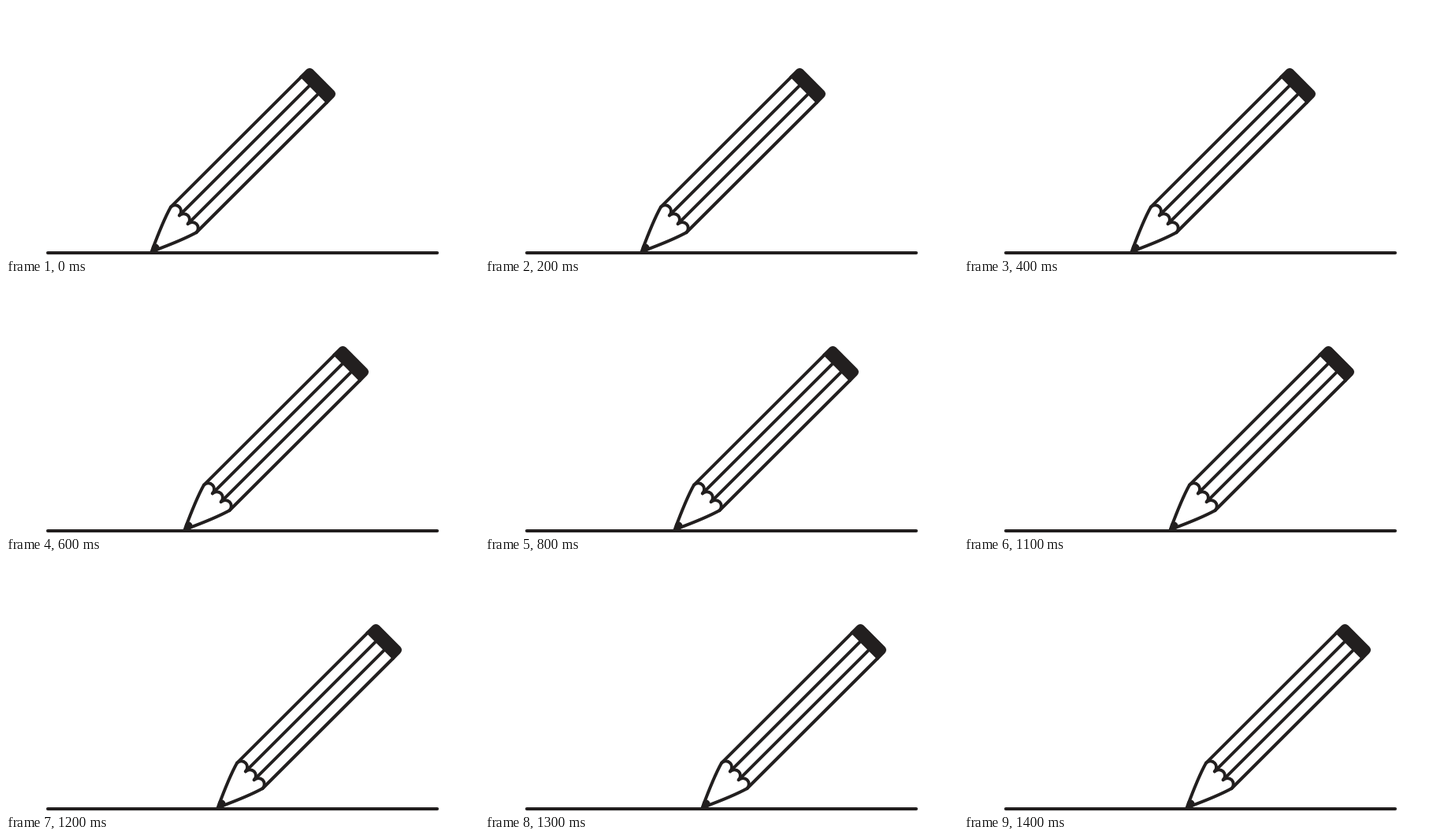
These frames come from a looping animation (600 px wide and 318 px high, 1.6 s). An HTML page with a canvas:

```html
<!DOCTYPE html>
<html lang="en">
<head>
<meta charset="utf-8">
<title>Pencil</title>
<style>
  html, body { margin: 0; width: 100%; height: 100%; overflow: hidden; background: #fff; }
  canvas { display: block; }
</style>
</head>
<body>
<canvas id="stage" width="600" height="318"></canvas>
<script>
const ctx = document.getElementById('stage').getContext('2d');
const INK = '#221f1f';
const LOOP = 1600, STEP = 100, LAST_STEP = 14, STRIDE = 7;

// Pencil space: tip at the origin, x runs along the shaft, y across it.
const SHOULDER = 57.3, HALF = 22.95, CAP = 290, END = 308.4;
const SCALLOP = HALF / 3;

function line(x1, y1, x2, y2) {
  ctx.beginPath();
  ctx.moveTo(x1, y1);
  ctx.lineTo(x2, y2);
  ctx.stroke();
}

function drawPencil(x, y) {
  ctx.save();
  ctx.translate(x, y);
  ctx.rotate(-Math.PI / 4);

  for (let i = -3; i <= 3; i += 2) {
    line(SHOULDER, i * SCALLOP, CAP + 1, i * SCALLOP);
  }

  // Sharpened wood with its wavy edge
  ctx.beginPath();
  ctx.moveTo(0, 0);
  ctx.quadraticCurveTo(38, -17.5, SHOULDER, -HALF);
  for (let i = -2; i <= 2; i += 2) {
    ctx.arc(SHOULDER, i * SCALLOP, SCALLOP, -Math.PI / 2, Math.PI / 2);
  }
  ctx.quadraticCurveTo(38, 17.5, 0, 0);
  ctx.closePath();
  ctx.stroke();

  // Lead
  ctx.beginPath();
  ctx.arc(6.8, 0, 4.9, 0, Math.PI * 2);
  ctx.fill();

  // Eraser cap
  ctx.beginPath();
  ctx.roundRect(CAP, -HALF - 2, END - CAP, 2 * HALF + 4, [0, 6, 6, 0]);
  ctx.fill();
  ctx.restore();
}

function draw(time) {
  const step = Math.min(LAST_STEP, Math.floor((time % LOOP) / STEP));
  ctx.fillStyle = '#fff';
  ctx.fillRect(0, 0, 600, 318);
  ctx.fillStyle = ctx.strokeStyle = INK;
  ctx.lineWidth = 4;
  ctx.lineCap = ctx.lineJoin = 'round';
  drawPencil(184.8 + step * STRIDE, 312.3);
  line(53, 314, 547, 314);
}

function tick() {
  draw(performance.now());
  requestAnimationFrame(tick);
}
tick();
</script>
</body>
</html>
```
